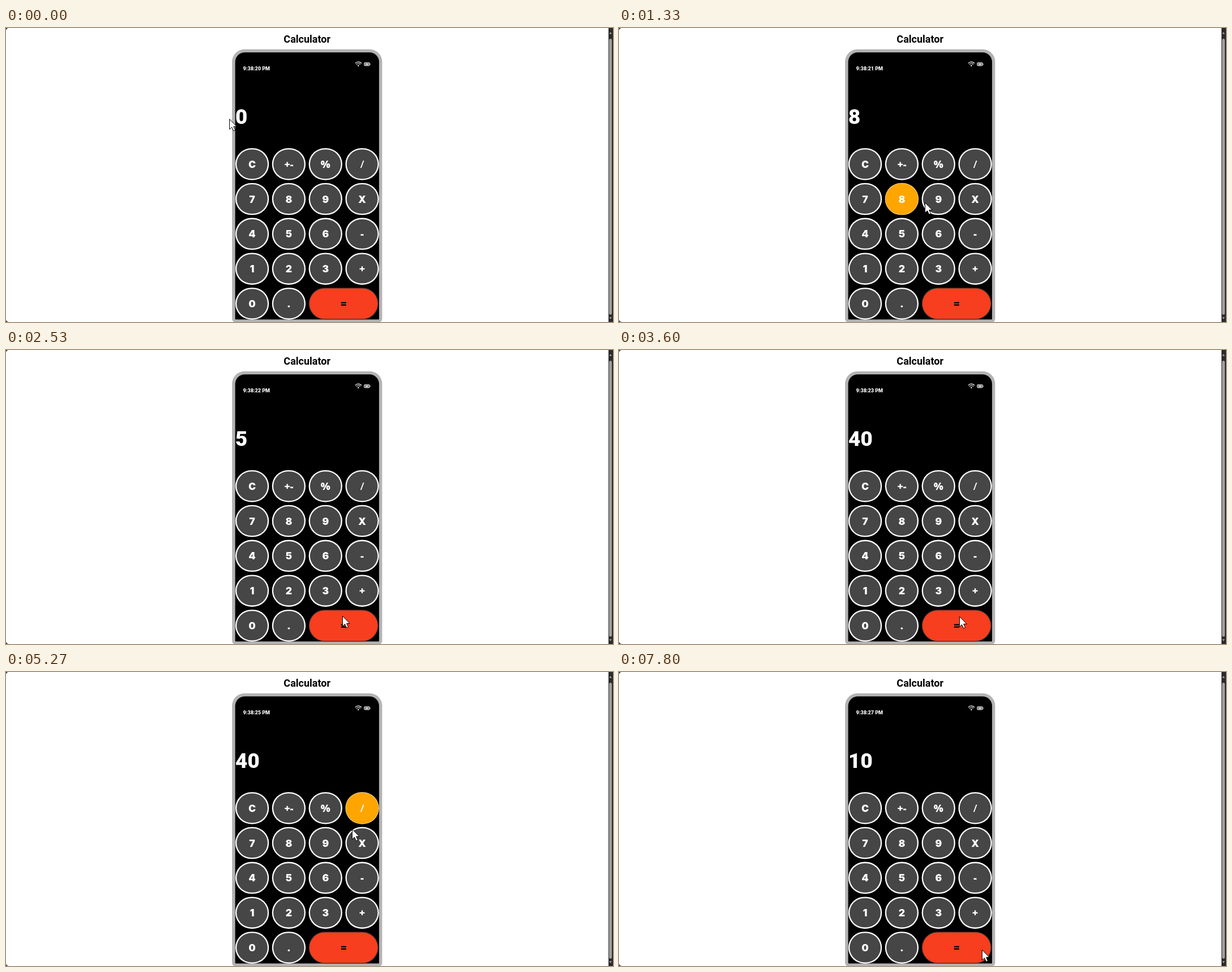
Write an HTML page with a canvas that moves like this. It is 1074x521 px and loops after 8 s.

```html
<!DOCTYPE html>
<html lang="en">
<head>
<meta charset="utf-8">
<title>Calculator</title>
<style>
  html, body { margin: 0; width: 100%; height: 100%; overflow: hidden; background: #fff; }
  canvas { display: block; width: 1074px; height: 521px; }
</style>
</head>
<body>
<canvas id="stage" width="1074" height="521"></canvas>
<script>
const ctx = document.getElementById('stage').getContext('2d');
const LOOP = 8000, RATE = 15;
const ROBOTO = 'Roboto, Arial, sans-serif';
const DIGITS = '900 17.5px Inter, "DejaVu Sans", sans-serif';
const SIGNS = '18px "Open Sans", Arial, sans-serif';
const KEY_W = 59.4, KEY_H = 56.5, PITCH_X = 64.9, PITCH_Y = 61.8;

// Pointer moves in ticks: each eases from the previous end point
const START = { x: 395, y: 161 };
const MOVES = [
  { from: 0, to: 8, x: 499, y: 360 },
  { from: 13, to: 17, x: 503, y: 306 },
  { from: 19, to: 23, x: 622, y: 316 },
  { from: 25, to: 30, x: 508, y: 364 },
  { from: 33, to: 38, x: 595, y: 471 },
  { from: 53, to: 55, x: 607, y: 473 },
  { from: 56, to: 66, x: 628, y: 372 },
  { from: 67, to: 75, x: 628, y: 248 },
  { from: 77, to: 80, x: 607, y: 287 },
  { from: 80, to: 92, x: 433, y: 354 },
  { from: 93, to: 95, x: 431, y: 348 },
  { from: 100, to: 107, x: 642, y: 492 }
];
// Display text from a given tick on
const DISPLAY = { 0: '0', 19: '8', 25: '0', 33: '5', 44: '40', 100: '4', 117: '10' };

const keys = ['C', '+-', '%', '/', ...'789X456-123+0.='].map((label, i) => ({
  label,
  x: 405.8 + (i % 4) * PITCH_X,
  y: 213 + Math.floor(i / 4) * PITCH_Y,
  w: label === '=' ? KEY_W + PITCH_X - 1 : KEY_W,
  h: KEY_H
}));

const easeOut = k => 1 - (1 - k) ** 1.35;

function pointer(tick) {
  let { x, y } = START;
  for (const m of MOVES) {
    if (tick <= m.from) break;
    const k = easeOut(Math.min(1, (tick - m.from) / (m.to - m.from)));
    x += (m.x - x) * k;
    y += (m.y - y) * k;
  }
  return { x: Math.round(x), y: Math.round(y) };
}

function rounded(x, y, w, h, r) {
  ctx.beginPath();
  ctx.roundRect(x, y, w, h, r);
}

function box(x, y, w, h, r, color) {
  rounded(x, y, w, h, r);
  ctx.fillStyle = color;
  ctx.fill();
}

function poly(points, color) {
  ctx.beginPath();
  points.forEach(([x, y]) => ctx.lineTo(x, y));
  ctx.closePath();
  ctx.fillStyle = color;
  ctx.fill();
}

function text(str, x, y, font, color, align = 'left') {
  ctx.font = font;
  ctx.fillStyle = color;
  ctx.textAlign = align;
  ctx.fillText(str, x, y);
}

function isOver({ x, y, w, h }, p) {
  rounded(x, y, w, h, h / 2);
  return ctx.isPointInPath(p.x, p.y);
}

function drawWindow() {
  ctx.fillStyle = '#2b2b2b';
  ctx.fillRect(0, 0, 1074, 521);
  box(0, 0, 1066, 521, [5, 0, 0, 5], '#fff');
  box(1067, 19, 5, 489, 2.5, '#9f9f9f');
  poly([[1067, 10.5], [1072, 10.5], [1069.5, 7]], '#9f9f9f');
  poly([[1067, 512.5], [1072, 512.5], [1069.5, 516]], '#9f9f9f');
  text('Calculator', 532.7, 26, '700 18px ' + ROBOTO, '#000', 'center');
}

function drawPhone() {
  box(400, 37.8, 265.5, 483.7, [22, 22, 6, 6], '#b3b3b3');
  box(405.5, 43.2, 254.6, 473.4, [17, 17, 1, 1], '#000');
}

function drawStatus(clock) {
  text(clock, 419.5, 75, '800 9px ' + ROBOTO, '#fff');
  ctx.strokeStyle = '#fff';
  ctx.lineWidth = 1.2;
  for (const r of [7.6, 4.8]) {
    ctx.beginPath();
    ctx.arc(623.4, 67.8, r, -Math.PI * .76, -Math.PI * .24);
    ctx.stroke();
  }
  ctx.beginPath();
  ctx.arc(623.4, 66.7, 1.2, 0, 7);
  ctx.fill();
  rounded(634, 61.7, 9, 5, 1.2);
  ctx.stroke();
  ctx.fillRect(635.6, 63.1, 5.8, 2.2);
  ctx.fillRect(643.6, 63.1, 1, 2.3);
}

function drawKey({ label, x, y, w, h }, hover) {
  const equals = label === '=';
  const edge = equals ? '#333' : hover ? '#ffe0a3' : '#fff';
  const fill = equals ? '#f73e1e' : hover ? '#ffa500' : '#464646';
  const b = equals ? 1.2 : hover ? 0.9 : 2.3;
  box(x, y, w, h, h / 2, edge);
  box(x + b, y + b, w - 2 * b, h - 2 * b, h / 2 - b, fill);
  const font = /\w/.test(label) ? DIGITS : (label === '/' ? 600 : 800) + ' ' + SIGNS;
  text(label, x + w / 2, y + h / 2 + 6.5, font, equals ? '#000' : '#fff', 'center');
}

function drawPointer({ x, y }) {
  const shape = [[.5, .5], [.5, 18.6], [4.6, 14.8], [7.6, 21.3], [10.6, 20], [7.7, 13.6], [13.2, 13.6]];
  poly(shape.map(([dx, dy]) => [x + dx, y + dy]), '#fff');
  ctx.strokeStyle = '#000';
  ctx.lineWidth = 1;
  ctx.stroke();
}

function draw(ms) {
  const tick = Math.floor((ms + 4) * RATE / 1000);
  const shown = Object.keys(DISPLAY).filter(t => t <= tick).pop();
  drawWindow();
  drawPhone();
  drawStatus(`9:38:${20 + Math.floor(tick / RATE)} PM`);
  text(DISPLAY[shown], 405.8, 169.7, '800 37px ' + ROBOTO, '#fff');
  // Highlight trails the pointer by one tick
  const last = pointer(tick - 1);
  for (const key of keys) drawKey(key, isOver(key, last));
  drawPointer(pointer(tick));
}

const start = performance.now();
function loop() {
  draw((performance.now() - start) % LOOP);
  requestAnimationFrame(loop);
}
loop();
</script>
</body>
</html>
```
